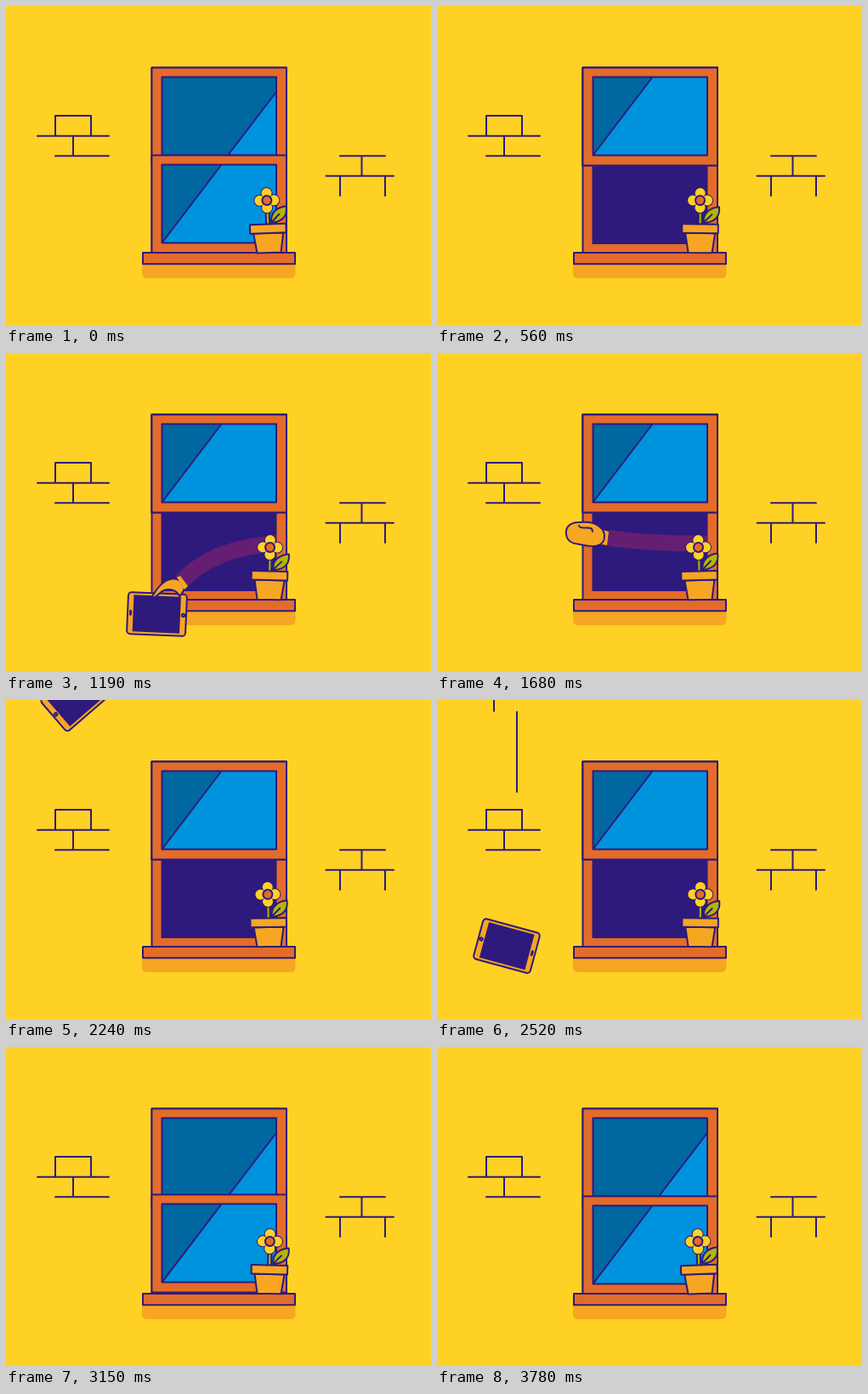
Recreate the animation shown at these times as an HTML page. Size 500 px wide and 375 px high, loop 3.85 s.

```html
<!DOCTYPE html>
<html lang="en">
<head>
<meta charset="utf-8">
<title>Window</title>
<style>
  html, body { margin: 0; height: 100%; overflow: hidden; background: #ffd124; }
  svg { display: block; width: 500px; height: 375px; }
  .line { stroke: #2e1a7c; stroke-width: 2; stroke-linejoin: round; stroke-linecap: round; }
  .wood { fill: #e36c2a; }
  .clay { fill: #f6a623; }
  .dark { fill: #2e1a7c; }
  .none { fill: none; }
</style>
</head>
<body>
<svg viewBox="0 0 500 375">
  <defs>
    <clipPath id="opening"><path d="M-50-100H318V475H-50z"/></clipPath>
    <g id="sash">
      <rect class="line wood" x="171.5" width="158.5" height="115"/>
      <rect x="183.5" y="11" width="134.5" height="92" fill="#0067a0"/>
    </g>
  </defs>

  <rect width="500" height="375" fill="#ffd124"/>
  <path class="line none" d="M58 152V129H100V152M37 152.7H121M79 153V176M58 176.3H121
    M393 176.3H446M418.5 177V199M376.5 199.8H456M393 200V223M446 200V223"/>
  <path class="line none" id="streaks"/>

  <path class="clay" d="M160 300H340.500V314Q340.500 320 334 320H166Q160 320 160 314z"/>
  <rect class="line wood" x="171.500" y="72.500" width="158.500" height="218"/>
  <path class="dark" d="M182.500 180H318.500V280H182.500z"/>
  <g transform="translate(0 72.500)">
    <use href="#sash"/>
    <path fill="#0093dd" d="M318 28.500V103H261z"/>
    <path class="line none" d="M318 28.500L261 103M183.500 11H318V103H183.500z"/>
  </g>
  <g id="lower">
    <use href="#sash"/>
    <path fill="#0093dd" d="M253.500 11H318V103H183.500z"/>
    <path class="line none" d="M253.500 11L183.500 103M183.500 11H318V103H183.500z"/>
  </g>
  <rect class="line wood" x="161" y="290" width="179" height="13.300"/>

  <g clip-path="url(#opening)">
    <path id="arm" fill="none" stroke="#641f73" stroke-width="19"/>
    <g id="tablet">
      <rect class="line clay" x="-34.500" y="-24.500" width="69" height="49" rx="4"/>
      <path class="dark" d="M-28-21.500H27.500V21.500H-28z"/>
      <rect class="dark" x="-32.500" y="-4" width="3" height="7" rx="1.500"/>
      <circle class="line wood" cx="31" r="1.700" stroke-width="1.500"/>
    </g>
    <g id="grip">
      <path class="line clay" d="M-34 17C-30 12-28 5-18-1C-11-5-5-4-1-1L4 7
        C3 12 1 14-2 17C-5 9-14 8-20 10C-25 12-28 17-31 18Q-34 19-34 17z"/>
      <path class="clay" d="M-5-5L-1-7L8 5L4 9z"/>
    </g>
    <g id="fist">
      <path class="clay" d="M-6-9L1-7L-1 9L-7 8z"/>
      <path class="line clay" d="M-6-9C-13-18-22-19-34-18C-46-18-50-11-49-4C-48 5-41 7-33 8
        C-25 10-14 11-9 8C-3 5-3-4-6-9z"/>
      <path class="line none" d="M-34-14C-32-9-25-13-20-11Q-18-10-18-7"/>
    </g>
  </g>

  <g id="plant">
    <path class="line" fill="#b3b600" d="M307.300 257V238H311.300V257z"/>
    <path class="line" fill="#b3b600" d="M313.500 255C312 243 321 237 331.500 236C333 248 326 254 313.500 255z"/>
    <path class="line none" d="M314 254L323 245"/>
    <path class="line clay" d="M292 267H327L323.500 290H295.500z"/>
    <rect class="line clay" x="288" y="256.500" width="42.500" height="10.500"/>
    <g transform="translate(309 228.500)" fill="#ffd124">
      <g id="petals">
        <circle cy="-8.500" r="6"/><circle cx="8.500" r="6"/>
        <circle cy="8.500" r="6"/><circle cx="-8.500" r="6"/>
      </g>
      <circle class="line wood" r="5.500"/>
    </g>
  </g>
</svg>
<script>
const LOOP = 3850;
const $ = id => document.getElementById(id);
const place = (id, x, y, angle = 0) =>
  $(id).setAttribute('transform', `translate(${x} ${y}) rotate(${angle})`);
const show = (id, on) => $(id).style.display = on ? '' : 'none';
const clamp = v => Math.min(1, Math.max(0, v));
const smooth = v => v * v * (3 - 2 * v);

// Stroke the petals first, then fill them again so only the outer outline stays.
const outline = $('petals').cloneNode(true);
outline.setAttribute('class', 'line');
outline.setAttribute('stroke-width', 4);
outline.removeAttribute('id');
$('petals').before(outline);

// time, wrist x, wrist y, hand angle, arm control x, arm control y
const reach = [
  [600, 410, 226, 40, 430, 226],
  [900, 199, 222, 40, 245, 226],
  [1000, 200, 226, 36, 240, 228],
  [1190, 206, 269, 0, 244, 228],
  [1260, 207, 271, -3, 245, 229],
  [1400, 210, 207, 60, 250, 212],
  [1500, 204, 205, 20, 245, 212],
  [1680, 201, 217, 0, 240, 224],
  [1800, 203, 218, 0, 245, 224],
  [2350, 385, 232, 0, 400, 226]
];

function pose(t) {
  const next = reach.findIndex(k => k[0] > t);
  if (next < 1) return null;
  const a = reach[next - 1], b = reach[next];
  const p = smooth((t - a[0]) / (b[0] - a[0]));
  return a.slice(1).map((v, i) => v + (b[i + 1] - v) * p);
}

function drawArm(t) {
  const hand = pose(t), held = t < 1400;
  show('arm', hand);
  show('grip', hand && held);
  show('fist', hand && !held);
  show('tablet', hand && held || !held && t < 2750);
  if (hand) {
    const [x, y, angle, cx, cy] = hand;
    $('arm').setAttribute('d', `M${x} ${y}Q${cx} ${cy} ${Math.max(x + 20, 320)} 224`);
    place(held ? 'grip' : 'fist', x, y, angle);
    if (held) {
      const r = angle * Math.PI / 180, c = Math.cos(r), s = Math.sin(r);
      place('tablet', x - 28.5 * c - 38 * s, y - 28.5 * s + 38 * c, angle + 2.5);
    }
  }
  if (!held) {
    const u = t - 2240, rising = u < -420;
    place('tablet', rising ? 163 : 82, -4 + 0.72 * u + 0.00115 * u * u,
      rising ? 62 + 0.3 * (t - 1400) : 139 + 0.2 * u);
  }
}

function drawStreaks(t) {
  const on = t > 2520 && t < 3000, y = 226 + 1.1 * (t - 2800);
  show('streaks', on);
  if (on) $('streaks').setAttribute('d', `M67 ${y}v94M94 ${y + 95}v94`);
}

function draw(t) {
  const open = smooth(clamp((t - 90) / 430));
  const shut = clamp((t - 2735) / 420) ** 2;
  place('lower', 0, 175.5 - 103 * (open - shut));
  drawStreaks(t);
  drawArm(t);
  const sway = -2 * Math.cos(4 * Math.PI * t / LOOP);
  $('plant').setAttribute('transform', `rotate(${sway} 309 290)`);
}

function tick() {
  draw(performance.now() % LOOP);
  requestAnimationFrame(tick);
}
tick();
</script>
</body>
</html>
```
